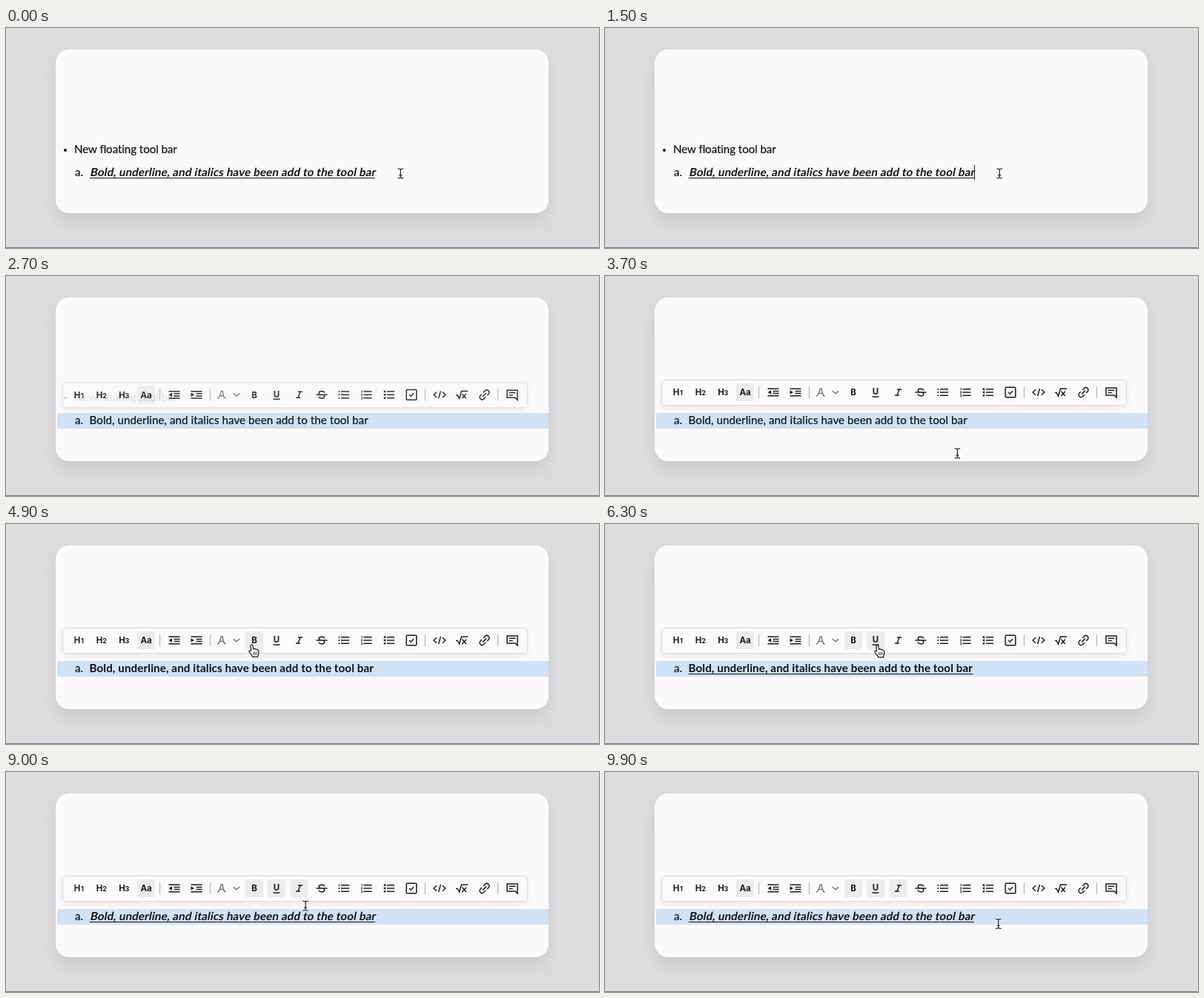
Recreate the animation shown at these times as an HTML page. Size 800 by 297 pixels, loop 10 s.

```html
<!DOCTYPE html>
<html lang="en">
<head>
<meta charset="utf-8">
<title>Floating tool bar</title>
<style>
html, body { margin: 0; width: 100%; height: 100%; overflow: hidden; }
body { position: relative; background: #dedcde; color: #111113; }
body > * { position: absolute; }
#card { left: 67px; top: 29px; width: 665px; height: 221px; border-radius: 18px;
  background: #fcf9fc; box-shadow: 0 14px 26px rgba(0,0,0,.07), 0 3px 18px rgba(0,0,0,.02); }
#edge { left: 0; right: 0; top: 296px; height: 1px; background: #787678; }
#select { left: 69px; top: 185px; width: 663px; height: 21px; border-radius: 3px 0 0 3px; background: #cfe2f6; }
#dot { left: 78px; top: 163px; width: 4px; height: 4px; border-radius: 50%; background: #111113; }
.line { font: 15.2px/20px Lato, sans-serif; white-space: pre; font-variant-ligatures: none;
  -webkit-text-stroke: .2px; }
#head { left: 92px; top: 153px; letter-spacing: -.1px; }
#mark { left: 93px; top: 184px; }
#text { left: 112.5px; top: 184px; letter-spacing: .04px; transform-origin: 0 16px;
  text-decoration-thickness: 1.2px; text-underline-offset: 1.6px; }
#text.bold { font-weight: 700; letter-spacing: .09px; -webkit-text-stroke: 0; }
#text.under { text-decoration-line: underline; }
#text.italic { transform: skewX(-11deg); letter-spacing: .12px; }
#caret { top: 185px; width: 1px; height: 20px; background: #111113; }
#bar { left: 76px; top: 140px; width: 626px; height: 33px; border: 1px solid #dcdadc; border-radius: 5px;
  background: #fcfafc; box-shadow: 0 3px 8px rgba(0,0,0,.07); }
#bar svg { position: absolute; left: -77px; top: -141px; }
#top { left: 0; top: 0; }
svg { overflow: visible; }
svg text { font: 700 11.5px Inter, sans-serif; text-anchor: middle; fill: #1b1b1d; stroke: none; }
svg .small { font-size: 9px; }
.icon { fill: none; stroke: #1b1b1d; stroke-width: 1.5; }
.icon .grey { stroke: #6b6a6c; stroke-width: 1.3; }
.icon .sep { stroke: #bdbbbe; stroke-width: 1.3; }
.icon .thin { stroke-width: .9; }
.solid { fill: #1b1b1d; stroke: none; }
.lit { fill: #edebed; stroke: none; }
</style>
</head>
<body>
<div id="card"></div>
<div id="edge"></div>
<div id="select"></div>
<div id="dot"></div>
<div id="head" class="line">New floating tool bar</div>
<div id="mark" class="line">a.</div>
<div id="text" class="line">Bold, underline, and italics have been add to the tool bar</div>
<div id="caret"></div>
<div id="bar"><svg width="800" height="297"></svg></div>
<svg id="top" width="800" height="297">
  <defs>
    <path id="stem" d="M-3.3-6.5Q-.4-6.5 0-5Q.4-6.5 3.3-6.5M0-5V5M-3.3 6.5Q-.4 6.5 0 5Q.4 6.5 3.3 6.5M-1.6 2.4h3.2"/>
  </defs>
  <g id="beam" fill="none" stroke-linecap="round">
    <use href="#stem" stroke="#fff" stroke-width="2.6" stroke-opacity=".7"/>
    <use href="#stem" stroke="#222" stroke-width="1.2"/>
  </g>
  <g id="hand" stroke="#161616" stroke-linejoin="round" stroke-linecap="round">
    <path fill="#fff" stroke-width="1.2" d="M-1.4 8.4L-2 1.6A1.4 1.4 0 0 1 .8 1.2L1.6 6Q2 5 3 5.2Q4 5.3 4.2 6.2
      Q6.2 5.4 6.6 7Q8.6 6.6 8.8 8.4V11.4C8.8 13.4 7.6 14.2 7.6 16.4H.6C.2 14-1.8 13-3.8 10C-4.9 8.2-3.2 7.3-2.2 8.2Z"/>
    <path fill="none" stroke-width=".9" d="M1.8 10v3.4M3.9 10v3.4M6 10v3.4"/>
  </g>
</svg>
<script>
const LOOP = 10000, STEP = 100;
const $ = id => document.getElementById(id);

// Tool bar icons, drawn around their own centre
const path = (d, cls = '') => `<path class="${cls}" d="${d}"/>`;
const label = (s, x = 0, cls = '') => `<text class="${cls}" x="${x}" y="4.2">${s}</text>`;
const heading = n => label('H', -2) + label(n, 5, 'small');
const sep = path('M0-8V8', 'sep');
const rows = 'M-7.5-4.7h15M-.5-1.6h8M-.5 1.6h8M-7.5 4.7h15';
const list = 'M-4-4.3h11M-4 0h11M-4 4.3h11';
const dots = (r, x) => [-4.3, 0, 4.3].map(y => `<circle class="solid" cx="${x}" cy="${y}" r="${r}"/>`).join('');

const icons = [
  [98, heading(1)],
  [128, heading(2)],
  [158.5, heading(3)],
  [189, label('Aa'), 'plain'],
  [207.5, sep],
  [227, path(rows) + path('M-3-2.8v5.6l-4.5-2.8z', 'solid')],
  [257, path(rows) + path('M-7.5-2.8v5.6l4.5-2.8z', 'solid')],
  [275.5, sep],
  [291, path('M-6 5C-3 5-2-.5-.6-5H1.2C2 0 2.4 5 5.6 5M-3 1.4H2.4', 'grey')],
  [311, path('M-4.2-2L0 2 4.2-2', 'grey')],
  [335, label('B'), 'bold'],
  [365, `<g transform="translate(0 -1)">${label('U')}</g>` + path('M-4.5 6h9'), 'under'],
  [395.5, path('M-1.5-4h6M-4.5 4h6M1.6-4L-1.6 4'), 'italic'],
  [426, path('M3.8-2.6C3.2-5.6-3.8-5.6-3.8-2.4Q-3.8-.8-1.6 0M1.6 0Q3.8.9 3.8 2.5C3.8 5.6-3.4 5.6-3.9 2.5M-7.5 0h15')],
  [456, path(list) + dots(1, -6.6)],
  [486.5, path(list) + path('M-7.2-5l1-.6v2.9M-7.4-.9h1.6l-1.5 2h1.6M-7.4 3.2h1.5v2.6h-1.5', 'thin')],
  [517, path('M-3-4.3h10M-3 0h10M-3 4.3h10') + dots(1.4, -6)],
  [547, '<rect x="-6.8" y="-6.8" width="13.6" height="13.6" rx="1"/>' + path('M-3 0l2.2 2.2L3-1.8')],
  [565.5, sep],
  [585, path('M-4-3.8L-7.8 0-4 3.8M4-3.8L7.8 0 4 3.8M1.4-5L-1.4 5')],
  [615, path('M-8 .5h2.2L-3.4 5.2-.6-4.8H8M.4-1.2L5.8 5M5.8-1.2L.4 5')],
  [645.5, '<g transform="rotate(-45)">' + path('M1-3.2H4.6a3.2 3.2 0 0 1 0 6.4H2M-1 3.2H-4.6a3.2 3.2 0 0 1 0-6.4H-2M-3.4 0h6.8') + '</g>'],
  [663.5, sep],
  [683, path('M-7-6H7V7L4 4H-7zM-4.2-2.8h8.4M-4.2.6h5')]
];
$('bar').firstChild.innerHTML = icons.map(([x, art, name]) =>
  `<g class="icon" transform="translate(${x} 157)">` +
  (name ? `<rect id="lit-${name}" class="lit" x="-12" y="-12" width="24" height="24" rx="3"/>` : '') +
  `${art}</g>`).join('');

// Pointer moves: start, end, from, bend, to
const REST = [532.3, 196.3], B = [332, 163], U = [368, 163.5], I = [387, 161.5];
const mid = (a, b) => a.map((v, i) => (v + b[i]) / 2);
const moves = [
  [3300, 4400, REST, [440, 306], B],
  [5300, 5800, B, mid(B, U), U],
  [6500, 6900, U, mid(U, I), I],
  [8800, 10050, I, [515, 310], REST]
];
// Format, time of the click, centre of its button
const formats = [['bold', 4700, 335], ['under', 5900, 365], ['italic', 7000, 395.5]];

const clamp = v => Math.min(1, Math.max(0, v));
const between = (t, a, b) => t >= a && t < b;
const show = (id, on) => $(id).style.visibility = on ? 'visible' : 'hidden';

function pointer(t) {
  const [a, b, p, c, q] = moves.filter(m => m[0] <= t).pop() || moves[0];
  const u = clamp((t - a) / (b - a)), s = u * u * (3 - 2 * u), r = 1 - s;
  return p.map((v, i) => r * r * v + 2 * r * s * c[i] + s * s * q[i]);
}

function draw(t) {
  const [x, y] = pointer(t);
  const seen = t < 1600 || t >= 3400;
  const onBar = t > 3400 && y < 175;

  show('select', t >= 2200);
  show('caret', between(t, 400, 900) || between(t, 1400, 1800));
  $('caret').style.left = (t < 1600 ? 498 : 488) + 'px';

  const p = clamp((t - 2500) / 300);
  $('bar').style.opacity = 1 - (1 - p) ** 2;
  $('bar').style.transform = `translateY(${10 * (1 - p)}px)`;

  for (const [name, at, centre] of formats) {
    const on = t < 1600 || t >= at;
    const hover = onBar && Math.abs(x - centre) < 12;
    $('text').classList.toggle(name, on);
    $('lit-' + name).style.opacity = t > 2200 && (on || hover) ? 1 : 0;
  }

  show('beam', seen && !onBar);
  show('hand', seen && onBar);
  const place = `translate(${x.toFixed(2)} ${y.toFixed(2)})`;
  $('beam').setAttribute('transform', place);
  $('hand').setAttribute('transform', place);
}

const start = performance.now();
function tick() {
  const t = (performance.now() - start) % LOOP;
  draw(Math.floor(t / STEP) * STEP);
  requestAnimationFrame(tick);
}
tick();
</script>
</body>
</html>
```
